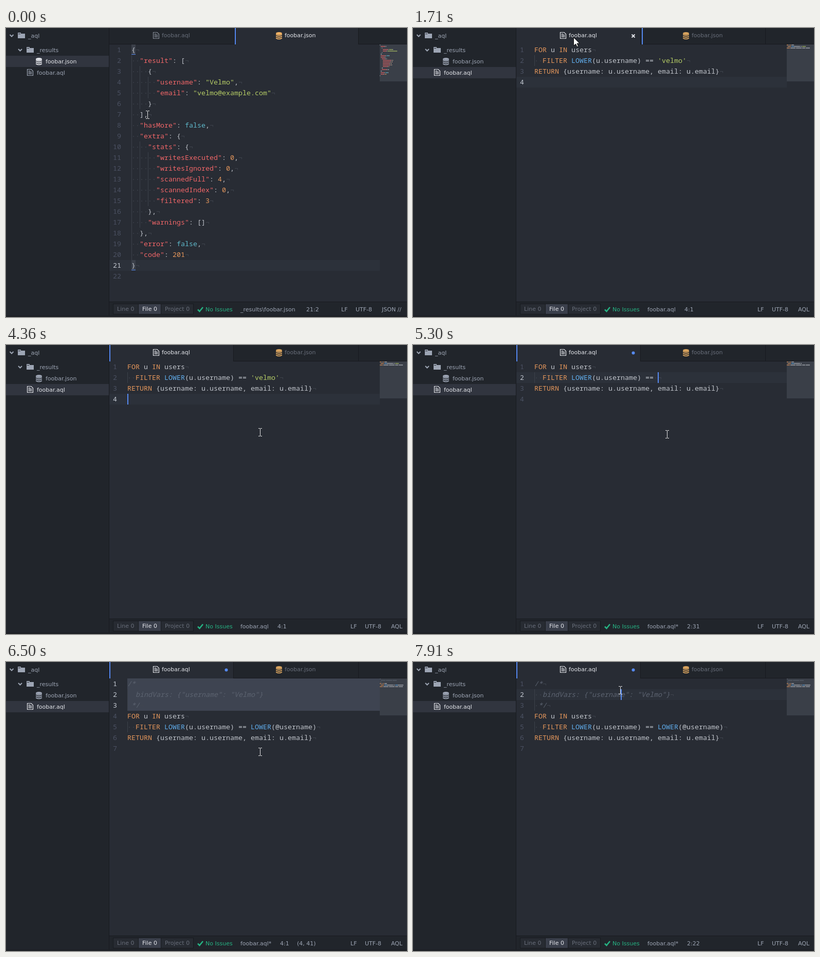
An HTML page with a canvas that plays this animation: 780x563 px, repeating every 8 s.

```html
<!DOCTYPE html>
<html lang="en">
<head>
<meta charset="utf-8">
<title>Query editor</title>
<style>
  html, body { margin: 0; width: 100%; height: 100%; overflow: hidden; background: #282c34; }
  canvas { display: block; }
</style>
</head>
<body>
<canvas id="stage" width="780" height="563"></canvas>
<script>
const ctx = document.getElementById('stage').getContext('2d');
const LOOP = 8000, LINE = 21, CHAR = 8, TOP = 32, MAP_X = 727;
const CODE_FONT = '13.333px "Noto Sans Mono", monospace';
const UI_FONT = '11px "DejaVu Sans", sans-serif';
const C = {
  panel: '#21252b', editor: '#282c34', edge: '#181a1f', row: '#2c313a', select: '#3e4451',
  text: '#bfc3ca', dim: '#686e7a', ui: '#9da5b4', bright: '#e4e6eb', blue: '#568af2',
  gutter: '#4b5162', ghost: '#414650', key: '#f06668', string: '#b5cc66', number: '#e5975c',
  constant: '#5fb9cb', keyword: '#e5975c', call: '#61afef', comment: '#5c6370', green: '#26b383'
};

const jsonLines = `{
  "result": [
    {
      "username": "Velmo",
      "email": "velmo@example.com"
    }
  ],
  "hasMore": false,
  "extra": {
    "stats": {
      "writesExecuted": 0,
      "writesIgnored": 0,
      "scannedFull": 4,
      "scannedIndex": 0,
      "filtered": 3
    },
    "warnings": []
  },
  "error": false,
  "code": 201
}
`.split('\n');

const literal = "'velmo'", call = 'LOWER(@username)';
const header = ['/*', '  bindVars: {"username": "Velmo"}', ' */'];
const queryLines = value => ['FOR u IN users', '  FILTER LOWER(u.username) == ' + value,
  'RETURN {username: u.username, email: u.email}', ''];

const grammars = {
  json: /(?<key>"[^"]*"(?=:))|(?<string>"[^"]*")|(?<constant>true|false)|(?<number>\d+)/g,
  aql: /(?<comment>^(?:\/\*| \*\/|  bindVars).*)|(?<keyword>\b(?:FOR|IN|FILTER|RETURN)\b)|(?<call>LOWER)|(?<string>'[^']*'?)/g
};

function tokenize(line, grammar) {
  const tokens = [];
  let end = 0;
  const add = (kind, from, to) => { if (to > from) tokens.push({ kind, col: from, text: line.slice(from, to) }); };
  for (const m of line.matchAll(grammar)) {
    add('text', end, m.index);
    end = m.index + m[0].length;
    add(Object.keys(m.groups).find(k => m.groups[k] !== undefined), m.index, end);
  }
  add('text', end, line.length);
  return tokens;
}

// Each step holds until the next one: [time, ...values]
const stepAt = (steps, t) => steps.reduce((cur, s) => s[0] <= t ? s : cur);

const pointer = [
  [0, 275, 169], [1040, 276, 158], [1165, 279, 98], [1290, 284, 36], [1440, 304, 22], [1560, 312, 18],
  [1860, 318, 113], [2010, 332, 160], [2135, 350, 182], [2260, 373, 190], [2530, 412, 182],
  [2655, 455, 173], [2780, 483, 168], [2920, 487, 168], [3040, 490, 168], [3160, 492, 168],
  [3280, 493, 168], [4360, 494, 170], [4510, 494, 172], [4790, 494, 174], [6350, 494, 175],
  [7400, 470, 148], [7525, 426, 88], [7650, 403, 55]
];
const deletions = [[0, 0], [4790, 1], [4915, 2], [5040, 4], [5180, 5], [5300, 7]];
const caretFlips = [400, 790, 1165, 1560, 1860, 2135, 2530, 2920, 3280, 3710, 4080, 5700, 7910];

function sceneAt(t) {
  if (t < 1710) return { json: true, lines: jsonLines, row: 20, col: 1 };
  const gone = stepAt(deletions, t)[1];
  const left = literal.length - gone;
  const scene = { lines: queryLines(literal.slice(0, left)), row: 3, col: 0, dirty: gone > 0 };
  if (t >= 4510) Object.assign(scene, { row: 1, col: 30 + left });
  if (t >= 5700) {
    scene.lines = queryLines(call);
    Object.assign(scene, { col: 46, selection: 'inline', count: '(1, 16)' });
  }
  if (t >= 6500) {
    scene.lines = header.concat(scene.lines);
    Object.assign(scene, { row: 3, col: 0, selection: 'block', count: '(4, 41)' });
  }
  if (t >= 7910) Object.assign(scene, { row: 1, col: 21, selection: null, count: '' });
  return scene;
}

function rect(x, y, w, h, color) {
  ctx.fillStyle = color;
  ctx.fillRect(x, y, w, h);
}

function label(text, x, y, color, align = 'left') {
  ctx.textAlign = align;
  ctx.fillStyle = color;
  ctx.fillText(text, x, y);
}

function stroke(points, color, width) {
  ctx.strokeStyle = color;
  ctx.lineWidth = width;
  ctx.beginPath();
  points.forEach(([x, y], i) => i ? ctx.lineTo(x, y) : ctx.moveTo(x, y));
  ctx.stroke();
}

function chevron(x, y) {
  stroke([[x, y], [x + 3.5, y + 3.5], [x + 7, y]], C.ui, 2);
}

function folder(x, y) {
  rect(x, y, 6, 3, C.ui);
  rect(x, y + 2, 14, 9, C.ui);
  rect(x + 1, y + 2, 4, 1, C.panel);
}

function documentIcon(x, y, color) {
  stroke([[x + .5, y + .5], [x + 8, y + .5], [x + 11.5, y + 4], [x + 11.5, y + 12.5], [x + .5, y + 12.5], [x + .5, y]], color, 1.2);
  [[3, 4], [5, 7], [7, 7], [9, 7]].forEach(([dy, w]) => rect(x + 2.5, y + dy, w, 1, color));
}

function database(x, y, color) {
  ctx.fillStyle = color;
  ctx.beginPath();
  ctx.ellipse(x + 6, y + 2.5, 6, 2.5, 0, 0, 7);
  ctx.fill();
  for (let i = 0; i < 3; i++) {
    const top = y + 3.6 + i * 3.4;
    ctx.beginPath();
    ctx.moveTo(x, top);
    ctx.quadraticCurveTo(x + 6, top + 4, x + 12, top);
    ctx.lineTo(x + 12, top + 2);
    ctx.quadraticCurveTo(x + 6, top + 5.8, x, top + 2);
    ctx.fill();
  }
}

function drawSidebar(json) {
  rect(0, 0, 200, 563, C.panel);
  rect(200, 0, 1, 563, C.edge);
  rect(0, json ? 54 : 76, 200, 22, '#31353f');
  ctx.font = UI_FONT;
  chevron(7.5, 13);
  folder(23, 9);
  label('_aql', 43, 19, C.ui);
  chevron(24, 41);
  folder(40, 37);
  label('_results', 60, 47, C.ui);
  const jsonColor = json ? C.bright : C.ui, aqlColor = json ? C.ui : C.bright;
  database(58, 58, jsonColor);
  label('foobar.json', 77, 69, jsonColor);
  documentIcon(41, 80, aqlColor);
  label('foobar.aql', 60, 91, aqlColor);
}

function drawTabs(t, scene) {
  const { json } = scene;
  rect(201, 0, 579, 32, C.panel);
  rect(201, 31, 579, 1, C.edge);
  if (json) rect(445, 0, 240, 32, C.editor);
  else rect(201, 0, 241, 32, C.editor);
  rect(json ? 444 : 442, 0, 1, 32, C.edge);
  rect(685, 0, 1, 32, C.edge);
  rect(t < 1860 ? 445 : 201, 0, 2, 32, C.blue);
  ctx.font = UI_FONT;
  const aqlColor = json ? C.dim : C.bright;
  documentIcon(286, 8, json ? '#858b96' : C.bright);
  label('foobar.aql', 303, 18, aqlColor);
  database(525, 8, json ? '#f5b566' : '#dba55f');
  label('foobar.json', 542, 18, json ? C.bright : C.dim);
  if (t >= 1440 && t < 1860) {
    stroke([[425.5, 12.5], [431.5, 18.5]], aqlColor, 2);
    stroke([[431.5, 12.5], [425.5, 18.5]], aqlColor, 2);
  }
  if (scene.dirty) {
    ctx.fillStyle = C.blue;
    ctx.beginPath();
    ctx.arc(428.5, 15.5, 3, 0, 7);
    ctx.fill();
  }
}

function drawMinimap(lines, grammar) {
  rect(MAP_X, TOP, 53, 72, '#3a3f48');
  ctx.globalAlpha = .55;
  lines.forEach((line, i) => tokenize(line, grammar).forEach(({ kind, col, text }) => {
    for (const word of text.matchAll(/\S+/g))
      rect(MAP_X + col + word.index, TOP + i * 3, word[0].length, 2, C[kind]);
  }));
  ctx.globalAlpha = 1;
}

function drawLine(line, y, left, grammar, last) {
  const indent = line.match(/^ */)[0].length;
  for (let col = 0; col < indent; col += 2) rect(left + col * CHAR, y, 1, LINE, '#3c414a');
  const base = y + 15;
  for (const { kind, col, text } of tokenize(line, grammar)) {
    ctx.font = (kind === 'comment' ? 'italic ' : '') + CODE_FONT;
    label(text, left + col * CHAR, base, C[kind]);
  }
  ctx.font = CODE_FONT;
  const trimmed = line.trimEnd().length;
  for (let col = 0; col < line.length; col++)
    if (col < indent || col >= trimmed) label('·', left + col * CHAR, base, C.ghost);
  if (!last) label('¬', left + line.length * CHAR, base, C.ghost);
}

function drawEditor(scene, caretOn) {
  const { json, lines, row, col, selection } = scene;
  const left = json ? 244 : 236;
  const grammar = json ? grammars.json : grammars.aql;
  const yOf = i => TOP + i * LINE;
  rect(201, TOP, 579, 501, C.editor);
  if (selection !== 'block') rect(201, yOf(row), MAP_X - 201, LINE, C.row);
  if (selection === 'block') rect(left, TOP, MAP_X - left, LINE * 3, C.select);
  if (selection === 'inline') rect(left + 30 * CHAR, yOf(1), 16 * CHAR, LINE, C.select);
  if (json) [0, 20].forEach(i => {
    rect(left, yOf(i), CHAR, LINE - 1, '#3b404a');
    rect(left, yOf(i) + LINE - 2, CHAR, 1, C.blue);
  });
  lines.forEach((line, i) => {
    const active = selection === 'block' ? i < 3 : i === row;
    ctx.font = CODE_FONT;
    label(i + 1, left - 20, yOf(i) + 15, active ? '#c2c7d0' : C.gutter, 'right');
    drawLine(line, yOf(i), left, grammar, i === lines.length - 1);
  });
  if (caretOn) rect(left + col * CHAR, yOf(row), 2, LINE, C.blue);
  drawMinimap(lines, grammar);
}

function drawStatus({ json, row, col, dirty, count }) {
  rect(201, 533, 579, 30, C.panel);
  rect(201, 533, 579, 1, C.edge);
  rect(208, 537, 157, 21, C.edge);
  rect(209, 538, 155, 19, '#272b32');
  rect(258, 538, 43, 19, '#3a3f4b');
  rect(257, 538, 1, 19, C.edge);
  rect(301, 538, 1, 19, C.edge);
  rect(0, 560, 780, 3, '#1d2025');
  ctx.font = UI_FONT;
  label('Line 0', 216, 551, C.dim);
  label('File 0', 265, 551, C.bright);
  label('Project 0', 309, 551, C.dim);
  stroke([[373, 548.5], [376.5, 552], [383, 544]], C.green, 2.6);
  label('No Issues', 388, 552, C.green);
  label(json ? '_results\\foobar.json' : 'foobar.aql' + (dirty ? '*' : ''), 456, 552, C.ui);
  label(`${row + 1}:${col + 1}`, json ? 584 : dirty ? 533 : 528, 552, C.ui);
  if (count) label(count, row === 1 ? 573 : 566, 552, C.ui);
  const shift = json ? 0 : 18;
  label('LF', 652 + shift, 552, C.ui);
  label('UTF-8', 680 + shift, 552, C.ui);
  label(json ? 'JSON //' : 'AQL', 731 + shift, 552, C.ui);
}

function drawPointer(t) {
  const [, x, y] = stepAt(pointer, t);
  if (t >= 1440 && t < 1860) {
    const shape = [[0, 0], [0, 16], [4, 12.5], [6.5, 18], [9, 17], [6.5, 11.5], [11.5, 11.5]];
    ctx.beginPath();
    shape.forEach(([dx, dy]) => ctx.lineTo(x + .5 + dx, y + .5 + dy));
    ctx.closePath();
    ctx.fillStyle = '#fff';
    ctx.fill();
    ctx.strokeStyle = '#111';
    ctx.lineWidth = 1;
    ctx.stroke();
    return;
  }
  rect(x, y - 7, 1, 14, '#e6e6e6');
  for (const serif of [y - 8, y + 7]) {
    rect(x - 3, serif, 3, 1, '#e6e6e6');
    rect(x + 1, serif, 3, 1, '#e6e6e6');
  }
}

function frame(now) {
  const t = now % LOOP;
  const scene = sceneAt(t);
  const caretOn = caretFlips.filter(flip => flip <= t).length % 2 === 1;
  drawEditor(scene, caretOn);
  drawTabs(t, scene);
  drawSidebar(scene.json);
  drawStatus(scene);
  drawPointer(t);
  requestAnimationFrame(now => frame(now - start));
}

const start = performance.now();
frame(0);
</script>
</body>
</html>
```
